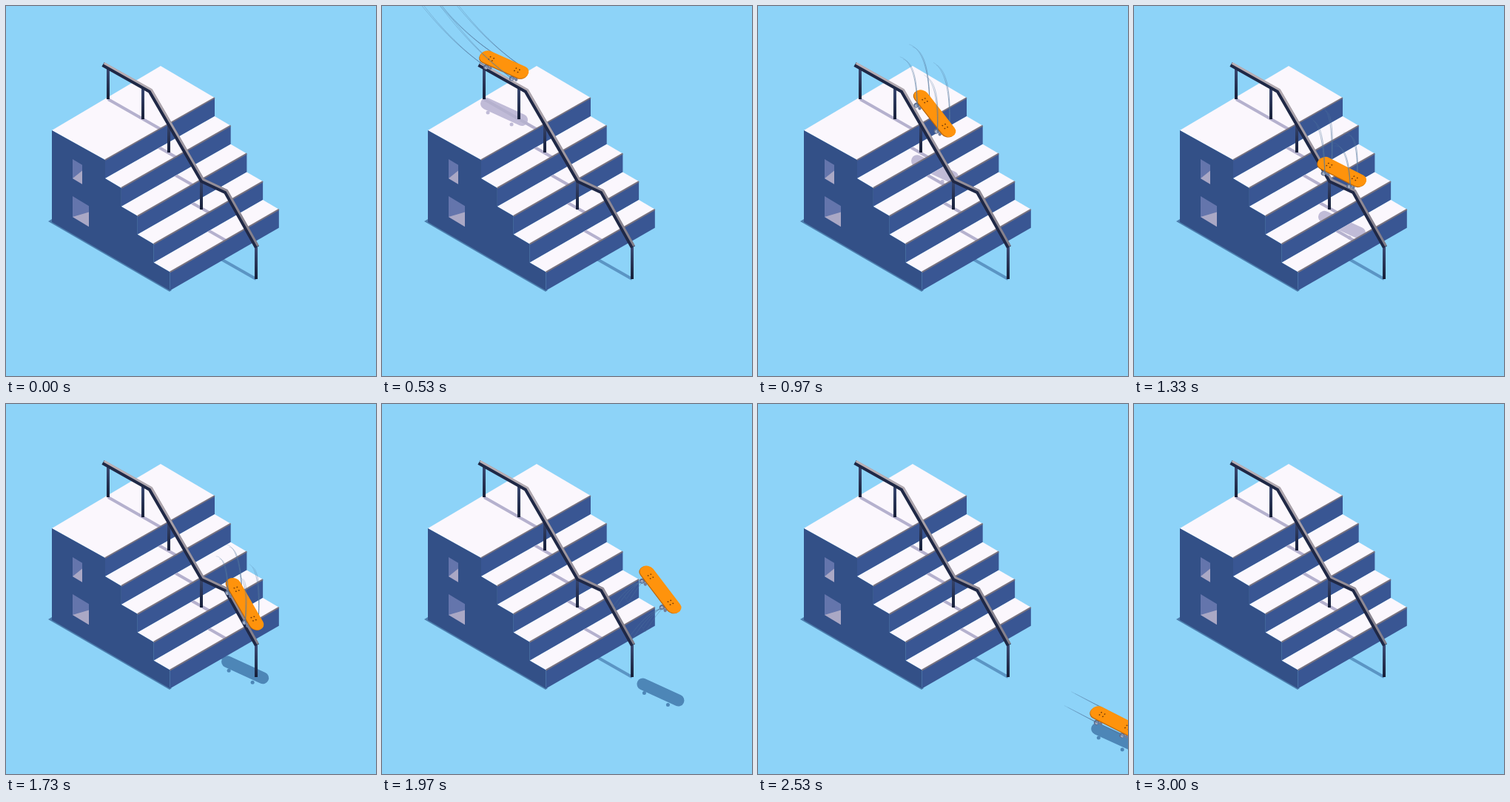
Animation of 500 by 500 pixels, one loop 3030 ms. Source, as an HTML page with a canvas:

```html
<!DOCTYPE html>
<html lang="en">
<head>
<meta charset="utf-8">
<title>Skateboard on stairs</title>
<style>
html, body { margin: 0; width: 100%; height: 100%; overflow: hidden; background: #8dd3f8; }
canvas { display: block; width: 500px; height: 500px; }
</style>
</head>
<body>
<canvas id="stage" width="500" height="500"></canvas>
<script>
const ctx = document.getElementById('stage').getContext('2d');
const LOOP = 3030, TRAIL = 165, ISO = 0.57;
const SKY = '#8dd3f8', FACE = '#335087', RISER = '#395693', TOP = '#fbf7fd', DARK = '#1f2846';
const STEPS = 5;

// Contact points: time, x, y, angle, lift of the hop that leads there
const contacts = [
  [340, 45, -50, 20, 0],
  [530, 165, 79, 24, -12],
  [690, 178, 87, 26, 0],
  [970, 239, 145, 52, 40],
  [1110, 251, 169, 58, 0],
  [1330, 281, 224, 27, 28],
  [1460, 288, 228, 27, 0],
  [1730, 323, 270, 60, 35],
  [1830, 336, 290, 60, 0],
  [2255, 409, 388, 38, 81],
  [2330, 430, 401, 27, 0],
  [2830, 560, 469, 27, 0]
];

function pose(t) {
  const i = contacts.findIndex(c => c[0] > t);
  if (i < 1) return null;
  const a = contacts[i - 1], b = contacts[i], lift = b[4];
  const f = (t - a[0]) / (b[0] - a[0]);
  const mix = (n, g) => a[n] + (b[n] - a[n]) * g;
  const deg = mix(3, f);
  return {
    x: mix(1, lift > 0 ? f * (2 - f) : f),
    y: mix(2, f) - lift * 4 * f * (1 - f),
    angle: deg * Math.PI / 180,
    half: 26 + (deg - 26) * 0.15
  };
}

// Height on screen of the surface below x: platform, then stairs, then ground
function floorBelow(x) {
  const platform = 143 + (x - 165) * ISO, ground = 407 + (x - 407) * ISO;
  return Math.min(ground, Math.max(platform, 168 + (x - 210) * 1.8));
}

// Point on the board: u along its length, v across it
function onBoard(p, u, v) {
  const c = Math.cos(p.angle), s = Math.sin(p.angle), a = u * p.half;
  return [p.x + a * c - v * s, p.y + a * s + v * c];
}

function trace(points) {
  const path = new Path2D();
  points.forEach(([x, y]) => path.lineTo(x, y));
  return path;
}

function fill(color, ...points) {
  const path = trace(points);
  path.closePath();
  ctx.fillStyle = color;
  ctx.fill(path);
  return path;
}

function line(color, width, points, cap = 'butt') {
  ctx.strokeStyle = color;
  ctx.lineWidth = width;
  ctx.lineCap = cap;
  ctx.lineJoin = 'round';
  ctx.stroke(trace(points));
}

function isoLine(color, width, x, y, length) {
  line(color, width, [[x, y], [x + length, y + length * ISO]]);
}

function dot(color, x, y, r) {
  ctx.fillStyle = color;
  ctx.beginPath();
  ctx.arc(x, y, r, 0, 7);
  ctx.fill();
}

function gradient(y1, y2, from, to) {
  const g = ctx.createLinearGradient(0, y1, 0, y2);
  g.addColorStop(0, from);
  g.addColorStop(1, to);
  return g;
}

function boardShadow(p, color) {
  const y = floorBelow(p.x);
  line(color, 16, [[p.x - 24, y - 11], [p.x + 24, y + 11]], 'round');
  for (const side of [-1, 1]) dot(color, p.x - 6 + side * 16, y + 9 + side * 8, 2.5);
}

function hole(x, y, width, height) {
  const drop = width * 0.6, r = x + width;
  fill('#6475ac', [x, y], [r, y + drop], [r, y + drop + height], [x, y + height]);
  fill('#aaa8c5', [x, y + height], [r, y + drop + height * 0.3], [r, y + drop + height]);
}

function stairs(p) {
  const treads = new Path2D();
  const profile = [[62, 292], [62, 168]];
  const left = i => [134 + 21.9 * i, 208 + 37.9 * i];
  const right = i => [282 + 21.7 * i, 124 + 37.7 * i];
  const down = ([x, y]) => [x, y + 25];

  fill('#4b7dad', [62, 288], [57, 291], [221, 386], [224, 384]);
  treads.addPath(fill(TOP, [62, 168], [209, 81], right(0), left(0)));
  for (let i = 0; i < STEPS; i++) {
    const l = left(i), r = right(i);
    fill(RISER, l, r, down(r), down(l));
    if (i < STEPS - 1) treads.addPath(fill(TOP, down(l), down(r), right(i + 1), left(i + 1)));
    profile.push(l, down(l));
  }
  fill(FACE, ...profile);
  hole(90, 207, 13, 26);
  hole(90, 257, 22, 28);

  ctx.save();
  ctx.clip(treads);
  if (p) boardShadow(p, '#c0bbd7');
  isoLine('#b5b1ce', 4, 138, 126, 79);
  for (let i = 0; i < STEPS - 1; i++) isoLine('#b5b1ce', 4, 203 + 22.7 * i, 189 + 37.7 * i, 28);
  ctx.restore();

  for (let i = 0; i < STEPS; i++) line('#77727f', 2, [left(i), right(i)]);
}

function rail() {
  for (const [x, foot] of [[138, 126], [185, 153], [220, 198], [264, 275], [338, 369]]) {
    line(gradient(foot - 43, foot, '#3b4a74', '#171f38'), 4, [[x, foot - 43], [x, foot]]);
  }
  const bar = [[131, 79], [195, 115], [265, 236], [297, 251], [339, 326]];
  line(DARK, 6.5, bar);
  line(gradient(80, 330, '#b9b0b6', '#817d89'), 3, bar.map(([x, y]) => [x + 1.5, y - 1.7]));
}

// Streaks follow the past positions of the trucks and fan out with age
function trails(t, v) {
  for (const u of [-0.74, 0.74]) {
    for (const side of [-1, 1]) {
      let last = null;
      for (let age = TRAIL; age >= 0; age -= 5) {
        const p = pose(t - age), old = age / TRAIL;
        if (!p) continue;
        const next = onBoard(p, u + side * 0.1 * old, v);
        ctx.globalAlpha = 0.8 * (1 - old * 0.75);
        if (last) line('#557a9f', 0.9, [last, next]);
        last = next;
      }
    }
  }
  ctx.globalAlpha = 1;
}

function board(p) {
  ctx.save();
  ctx.translate(p.x, p.y);
  ctx.rotate(p.angle);
  const h = p.half, trucks = [-0.74 * h, 0.74 * h];
  for (const x of trucks) {
    line('#8591ac', 4, [[x, 8], [x, 13]]);
    dot('#5c6b8c', x - 2, 13, 3.4);
    dot('#a4afc6', x - 1.5, 13.5, 2.1);
    dot('#6f7d9b', x + 4, 12, 2.2);
  }
  ctx.transform(1, 0, -0.2, 1, 0, 0);
  line('#b8650d', 18, [[-h, 1.2], [h, 1.2]], 'round');
  line('#ff930c', 18, [[-h, 0], [h, 0]], 'round');
  for (const x of trucks) {
    for (const dx of [-2.5, 2.5]) {
      for (const dy of [-2, 2]) dot('#743b08', x + dx, dy, 0.9);
    }
  }
  ctx.restore();
}

function draw(now) {
  const t = now % LOOP, p = pose(t);
  ctx.fillStyle = SKY;
  ctx.fillRect(0, 0, 500, 500);
  isoLine('#5b95c4', 4, 280, 336, 58);
  if (p && p.x > 260) boardShadow(p, '#4d86b7');
  stairs(p);
  if (p) trails(t, -8);
  rail();
  if (p) {
    board(p);
    trails(t, 13);
  }
}

const start = performance.now();
function tick() {
  draw(performance.now() - start);
  requestAnimationFrame(tick);
}
tick();
</script>
</body>
</html>
```
